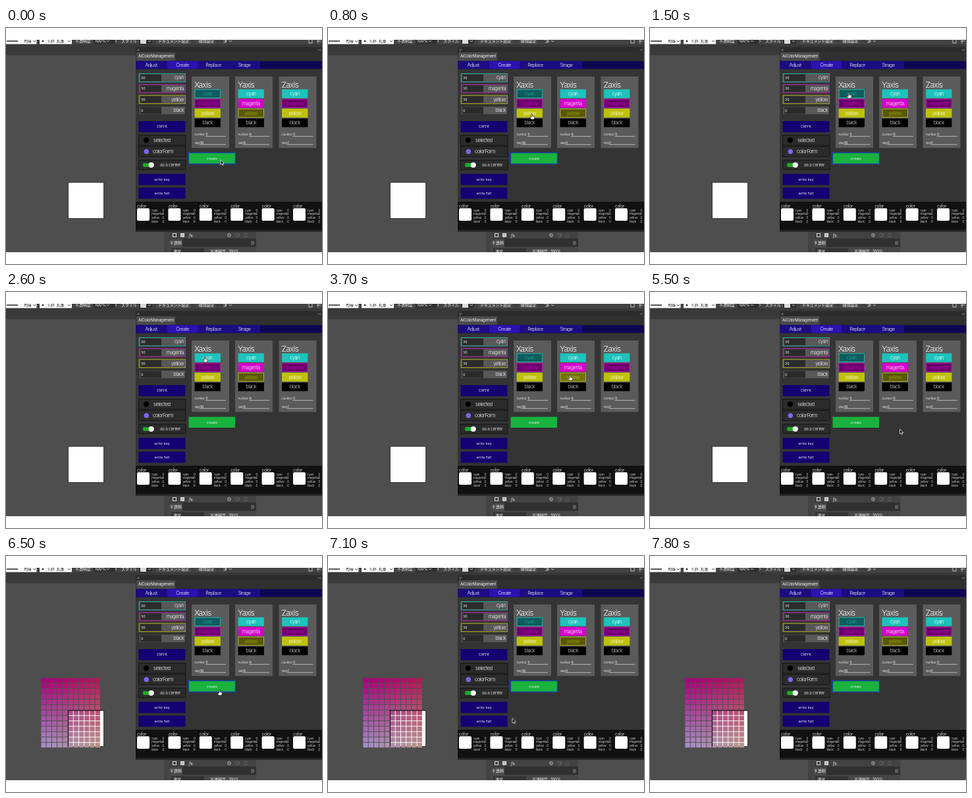
These frames come from a looping animation (480 px wide and 360 px high, 8 s). An HTML page:

```html
<!DOCTYPE html>
<html lang="ja">
<head>
<meta charset="utf-8">
<style>
html, body { margin: 0; width: 480px; height: 360px; overflow: hidden; background: #fff; }
svg { display: block; }
text { font-family: Inter, "Noto Sans CJK JP", "Noto Sans CJK", sans-serif; letter-spacing: -0.07em; white-space: pre; }
</style>
</head>
<body>
<svg id="stage" width="480" height="360" viewBox="0 0 480 360">
  <defs><clipPath id="screen"><rect y="18" width="480" height="324"/></clipPath></defs>
</svg>
<script>
const LOOP = 8000, STEP = 100;
const stage = document.getElementById('stage');

function add(parent, tag, attrs, content) {
  const node = document.createElementNS('http://www.w3.org/2000/svg', tag);
  for (const key in attrs) node.setAttribute(key, attrs[key]);
  if (content !== undefined) node.textContent = content;
  parent.appendChild(node);
  return node;
}

const root = add(stage, 'g', { 'clip-path': 'url(#screen)' });
const box = (x, y, width, height, fill, extra) =>
  add(root, 'rect', { x, y, width, height, fill, ...extra });
const text = (value, x, y, size, extra) =>
  add(root, 'text', { x, y, 'font-size': size, fill: '#f4f4f4', 'font-weight': 300, ...extra }, value);
const line = (d, stroke = '#ddd', width = 0.8) =>
  add(root, 'path', { d, stroke, 'stroke-width': width, fill: 'none' });
const middle = { 'text-anchor': 'middle' };
const end = { 'text-anchor': 'end' };
const regular = { 'font-weight': 400, style: 'letter-spacing:-.02em' };
const spaced = { ...middle, 'font-weight': 400, style: 'letter-spacing:.03em' };

const mix = (a, b, k) => a.map((v, i) => v + (b[i] - v) * k);
const rgb = c => `rgb(${c.map(Math.round)})`;

const INKS = {
  cyan: { bright: [28, 196, 188], dark: [14, 92, 92] },
  magenta: { bright: [214, 0, 204], dark: [104, 0, 104] },
  yellow: { bright: [192, 194, 8], dark: [88, 88, 4] },
  black: { bright: [0, 0, 0], dark: [0, 0, 0] }
};
const NAMES = Object.keys(INKS);

function drawDocument() {
  box(0, 18, 480, 324, '#4e4e4e');
  box(0, 25, 480, 16.5, '#393939');
  box(94.5, 235.5, 54, 55, '#fff', { stroke: '#222', 'stroke-width': 0.8 });
}

function drawToolbar() {
  box(0, 18, 480, 7, '#424242');
  [[0, 46.5], [51, 49]].forEach(([x, w]) => box(x, 18, w, 6.5, '#fff'));
  [[133, 32], [202, 20]].forEach(([x, w]) => box(x, 18, w, 6.5, '#303030'));
  [[228, 53], [289, 29]].forEach(([x, w]) => box(x, 18, w, 6.5, '#4a4a4a'));
  line('M1 20H18', '#111', 1.4);
  line('M41 19l2 2 2-2M94 19l2 2 2-2', '#222');
  line('M153 19l2 2 2-2M216 19l2 2 2-2M339 19l2 2 2-2M166 18l2 2-2 2');
  add(root, 'circle', { cx: 56, cy: 20, r: 1.3, fill: '#111' });
  box(204, 18, 9, 6, '#ddd');
  const dark = { ...regular, fill: '#111' };
  text('均等', 27, 22, 6, dark);
  text('5 pt. 丸筆', 63, 22, 6, dark);
  text('不透明度 :', 105, 22, 6, regular);
  text('100%', 135, 22.4, 6.6, regular);
  text('スタイル :', 175, 22, 6, regular);
  text('ドキュメント設定', 231, 22, 6, regular);
  text('環境設定', 292.5, 22, 6, regular);
  line('M329 18h5v4h-4M332 20h4M460 18v5h5v-5M474 18v6M472 20h6');
}

function drawHeader() {
  box(197, 29, 283, 281, '#343434');
  box(197, 29, 283, 8, '#2b2b2b');
  line('M199.5 32l3 3m0-3l-3 3', '#bbb', 0.6);
  line('M475.5 32l-1.5 1.5 1.5 1.5m2.5-3l-1.5 1.5 1.5 1.5', '#bbb', 0.6);
  box(197, 37, 283, 13, '#303030');
  box(198, 37, 59, 13, '#4b4b4b');
  text('AiColorManagement', 201, 45, 6, { 'font-weight': 400, style: 'letter-spacing:-.04em' });
  box(197, 50.5, 283, 12, '#0d0750');
  box(197, 50.5, 189, 12, '#1c0c82');
  box(245, 50.5, 46, 12, '#2c12b0');
  [['Adjust', 220.5], ['Create', 268], ['Replace', 315], ['Strage', 362]]
    .forEach(([name, x]) => text(name, x, 59.4, 7.3, middle));
}

function drawButton(label, y) {
  box(201.5, y, 71, 17, '#150072');
  text(label, 237, y + 10.4, 5.2, spaced);
}

function drawControls() {
  NAMES.forEach((name, i) => {
    const y = 69.5 + i * 16.6;
    const stroke = i < 3 ? rgb(INKS[name].bright) : '#222';
    box(202, y, 70.5, 12.8, '#585858', { stroke, 'stroke-width': 0.9, 'stroke-opacity': 0.8 });
    box(204, y + 1.2, 32, 10.4, '#2b2b2b');
    text(i < 3 ? 30 : 0, 205, y + 8.3, 5.4, regular);
    text(name, 270, y + 8.9, 7.4, end);
  });
  drawButton('CMYK', 142);
  [[163.5, 15.5], [180.5, 16], [201.5, 14.5]]
    .forEach(([y, h]) => box(201.5, y, 71.5, h, '#2b2b2b', { stroke: '#151515' }));
  add(root, 'circle', { cx: 213, cy: 171, r: 4.2, fill: '#000' });
  add(root, 'circle', { cx: 213.3, cy: 188.5, r: 3.8, fill: '#746af0' });
  text('selected', 224, 173.6, 7.6);
  text('colorForm', 223, 191, 7.6);
  box(208, 206, 16, 6, '#1aaa28', { rx: 2 });
  add(root, 'circle', { cx: 220.7, cy: 209, r: 4.1, fill: '#fff' });
  text('as a center', 234, 211.4, 7.1);
  drawButton('write key', 222.5);
  drawButton('write falt', 243.5);
}

function drawInk(name, x, y) {
  const rect = box(x, y, 38.5, 12.5, '#000', { stroke: rgb(INKS[name].bright), 'stroke-width': 0.8 });
  const label = text(name, x + 19.2, y + 8.9, 7.5, middle);
  return level => {
    const { bright, dark } = INKS[name];
    rect.setAttribute('fill', rgb(mix(dark, bright, level)));
    const faded = name === 'black' ? [190, 190, 190] : mix(dark, bright, 0.75);
    label.setAttribute('fill', rgb(mix(faded, [250, 250, 250], level)));
  };
}

function drawAxis(title, x, dim, number, step) {
  box(x, 74, 57, 109, '#5b5b5b');
  text(title, x + 4, 90.5, 12.2);
  const inks = {};
  NAMES.forEach((name, i) => {
    inks[name] = drawInk(name, x + 5, 94 + i * 14.8);
    inks[name](dim.includes(name) ? 0 : name === 'black' ? 0.2 : 1);
  });
  [['number', number, 164, 21], ['step', step, 176.5, 12.5]].forEach(([label, value, y, offset]) => {
    text(label + ':', x + 4.5, y, 4.8);
    text(value, x + offset + 0.5, y, 5.4, regular);
    line(`M${x + offset} ${y + 1.3}H${x + 52}`, '#ddd', 0.7);
  });
  return inks;
}

function drawSwatches() {
  box(197, 265, 283, 43.5, '#111');
  for (let i = 0; i < 6; i++) {
    const x = 199 + i * 47.4;
    text('color', x, 273.7, 7);
    box(x, 275, 19, 19, '#fff', { rx: 2 });
    NAMES.forEach((name, row) => {
      const y = 279.5 + row * 5.7;
      text(name, x + 22, y, 4.7);
      text(':0', x + 41, y, 4.7, end);
    });
  }
}

function drawBottomPanel() {
  box(197, 308.5, 283, 2.5, '#292929');
  box(240, 311, 8, 31, '#434343');
  box(248, 311, 132, 10, '#424242');
  box(253.5, 313.5, 5, 5, 'none', { stroke: '#ddd' });
  box(265.5, 313.5, 5, 5, '#bbb', { stroke: '#ddd' });
  text('fx.', 278, 318.5, 6.5, { ...regular, 'font-style': 'italic' });
  add(root, 'circle', { cx: 339, cy: 316, r: 2.4, fill: 'none', stroke: '#ccc', 'stroke-width': 0.8 });
  line('M337.4 314.4l3.2 3.2', '#ccc');
  line('M349 313.5h5v5h-5zM351 316h5M361.5 314h5M362 315v4h4v-4', '#666');
  box(248, 321, 132, 13, '#303030');
  box(248, 322, 20, 12, '#4b4b4b');
  text('◊ 透明', 250, 330, 6, regular);
  line('M372 326h5m-5 2h5m-5 2h5', '#aaa', 0.7);
  box(248, 334, 132, 8, '#464646');
  box(251, 336, 50, 6, '#333');
  text('通常', 254, 342.5, 6, regular);
  text('不透明度 : 100%', 310, 342.5, 6, regular);
}

function drawGrid() {
  const grid = add(root, 'g', {});
  const columns = 11, rows = 13, pitch = 8.22;
  const top = [[170, 0, 124], [180, 24, 92]];
  const bottom = [[162, 140, 200], [184, 146, 138]];
  for (let r = 0; r < rows; r++) {
    for (let c = 0; c < columns; c++) {
      const u = c / (columns - 1), v = r / (rows - 1);
      const fill = rgb(mix(mix(top[0], top[1], u), mix(bottom[0], bottom[1], u), v));
      add(grid, 'rect', { x: 53.4 + c * pitch, y: 186.2 + r * pitch, width: 7.3, height: 7.3, fill });
    }
  }
  add(grid, 'path', { d: 'M94.5 290.5V235.7H148', fill: 'none', stroke: '#111' });
  return grid;
}

drawDocument();
drawToolbar();
drawHeader();
drawControls();
const xAxis = drawAxis('Xaxis', 282, ['cyan', 'magenta'], 5, 10);
const yAxis = drawAxis('Yaxis', 348, ['yellow'], 6, 5);
drawAxis('Zaxis', 414.5, ['magenta'], 0, 1);
box(277.5, 190.5, 70.5, 16.5, '#19b23e');
const focusRing = box(277.3, 190.3, 71.2, 17, 'none', { stroke: '#1746a4', 'stroke-width': 1.5 });
text('create', 313, 200.8, 5.2, spaced);
drawSwatches();
drawBottomPanel();
const grid = drawGrid();

const pointer = add(root, 'g', {});
const arrow = add(pointer, 'path', {
  d: 'M0 0V7.5L1.8 6 3 8.6 4.2 8 3 5.5H5.3Z', fill: '#111', stroke: '#fff', 'stroke-width': 0.7
});
const hand = add(pointer, 'path', {
  d: 'M-.8 0Q0-1 .8 0V3L3.6 3.6Q4.6 4 4.3 5.2L3.4 8.2H-.6L-3 5.2Q-2.6 4-1.5 4.8L-.8 5.2Z',
  fill: '#fff', stroke: '#111', 'stroke-width': 0.7
});

// Pointer path: time, x, y
const PATH = [
  [0, 326, 201], [300, 326, 201], [1100, 302, 99], [3000, 302, 99], [3500, 367.5, 127],
  [4700, 367.5, 127], [5300, 379.5, 209], [5500, 379.5, 209], [5900, 324, 204.5],
  [6800, 324, 204.5], [7600, 185, 340]
];

function pointerAt(t) {
  const next = PATH.findIndex(p => p[0] > t);
  if (next < 0) return null;
  const a = PATH[next - 1], b = PATH[next];
  const k = (t - a[0]) / (b[0] - a[0]);
  return mix(a.slice(1), b.slice(1), k * k * (3 - 2 * k));
}

const clamp = v => Math.max(0, Math.min(1, v));
const pulse = (t, on, off, ramp) => clamp((t - on) / ramp) * clamp(1 - (t - off) / ramp);

function isOverControl([x, y]) {
  const overInk = y > 93 && y < 151 && [287, 353, 419.5].some(left => x > left && x < left + 39);
  return overInk || (x > 277 && x < 348 && y > 202 && y < 207);
}

function update(t) {
  xAxis.cyan(pulse(t, 1900, 3000, 200));
  yAxis.yellow(pulse(t, 3650, 4500, 200));
  focusRing.setAttribute('display', t < 1900 || t >= 5900 ? 'inline' : 'none');
  grid.setAttribute('display', t >= 6100 ? 'inline' : 'none');
  const spot = pointerAt(t);
  pointer.setAttribute('display', spot ? 'inline' : 'none');
  if (!spot) return;
  pointer.setAttribute('transform', `translate(${spot})`);
  const over = t > 300 && isOverControl(spot);
  arrow.setAttribute('display', over ? 'none' : 'inline');
  hand.setAttribute('display', over ? 'inline' : 'none');
}

const start = performance.now();
function tick() {
  const t = (performance.now() - start) % LOOP;
  update(Math.floor(t / STEP) * STEP);
  requestAnimationFrame(tick);
}
tick();
</script>
</body>
</html>
```
